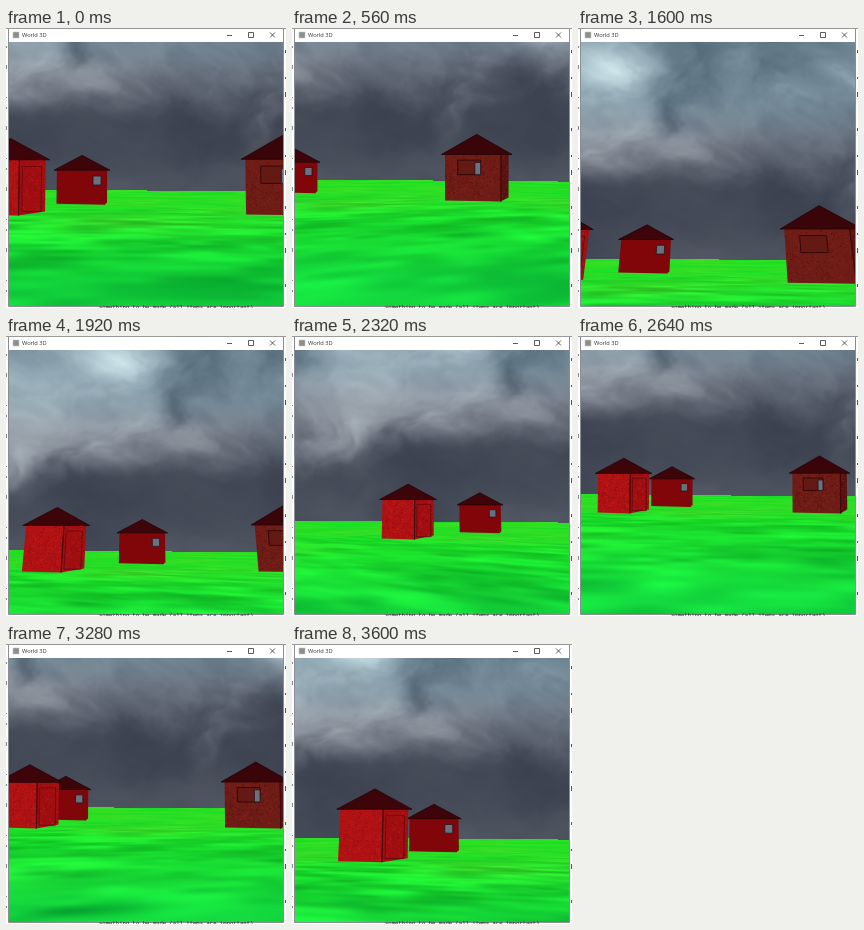
These frames come from a looping animation (280 px wide and 280 px high, 3.76 s). An HTML page with a canvas:

```html
<!DOCTYPE html>
<html lang="en">
<head>
<meta charset="utf-8">
<title>World 3D</title>
<style>
  html, body { margin: 0; width: 100%; height: 100%; overflow: hidden; background: #fff; }
  #stage { position: relative; width: 280px; height: 280px; overflow: hidden; background: #fff; }
  canvas, svg { position: absolute; left: 0; top: 0; }
  #title { position: absolute; left: 16px; top: 2px; font: 5.7px/10px "Open Sans", sans-serif; color: #333; white-space: nowrap; }
  #below { position: absolute; left: 93px; top: 277px; height: 3px; overflow: hidden; font: 5.6px/6px "Liberation Mono", monospace; color: #222; white-space: nowrap; }
</style>
</head>
<body>
<div id="stage">
  <canvas id="view" width="280" height="280"></canvas>
  <svg width="280" height="280" fill="none" stroke="#333">
    <path d="M0 .5H280" stroke="#999"/>
    <path d="M2.5 1V278.5H277.5V1" stroke="#8a8e92"/>
    <path d="M.5 18V270" stroke="#888" stroke-dasharray="2 17 4 28 1 9"/>
    <path d="M279.5 22V270" stroke="#555" stroke-dasharray="3 24 2 13 5 31"/>
    <rect x="7" y="4" width="6" height="6" fill="#8b8f8c" stroke="#c4c7c4" stroke-width=".6"/>
    <path d="M221 7.5h5M242.5 4.5h5v5h-5zM264 4.5l5 5M269 4.5l-5 5" stroke-width=".8"/>
  </svg>
  <div id="title">World 3D</div>
  <div id="below">something to be made (all items are important)</div>
</div>
<script>
const LOOP = 3760, STEP = 80, SIZE = 280, MID = SIZE / 2, FOCAL = 300;
const VIEW = { x: 3, y: 14, w: 274, h: 264 };
const ctx = document.getElementById('view').getContext('2d');

const lerp = (a, b, t) => a + (b - a) * t;
const clamp = (v, lo, hi) => Math.max(lo, Math.min(hi, v));
const smooth = (a, b, v) => {
  const s = clamp((v - a) / (b - a), 0, 1);
  return s * s * (3 - 2 * s);
};

function rng(seed) {
  return () => (seed = (seed * 1664525 + 1013904223) >>> 0) / 4294967296;
}

function makeCanvas(w, h) {
  const c = document.createElement('canvas');
  c.width = w;
  c.height = h;
  return c;
}

// Smooth value noise on a wrapped 64 x 64 lattice
const lattice = Float32Array.from({ length: 4096 }, rng(11));
function noise(x, y) {
  const xi = Math.floor(x), yi = Math.floor(y);
  const fx = smooth(0, 1, x - xi), fy = smooth(0, 1, y - yi);
  const at = (i, j) => lattice[((yi + j) & 63) * 64 + ((xi + i) & 63)];
  return lerp(lerp(at(0, 0), at(1, 0), fx), lerp(at(0, 1), at(1, 1), fx), fy);
}
function fbm(x, y) {
  let sum = 0, amp = .5;
  for (let i = 0; i < 5; i++, amp *= .48) {
    sum += amp * noise(x, y);
    x = x * 2.03 + 7;
    y = y * 2.03 + 3;
  }
  return sum;
}

// The camera looks around in wide sweeps; depth is the distance to the front row of houses
const path = [
  { t: 0, horizon: 163, pan: 140, x: 4.67, depth: 41 },
  { t: 560, horizon: 153, pan: 46, x: 3.5, depth: 49 },
  { t: 1200, horizon: 197, pan: -30, x: 3, depth: 43.5 },
  { t: 1600, horizon: 232, pan: 160, x: 6.8, depth: 42 },
  { t: 2320, horizon: 186, pan: 288, x: 8.9, depth: 57 },
  { t: 2960, horizon: 142, pan: 20, x: 1.5, depth: 55 },
  { t: 3600, horizon: 195, pan: 194, x: 3.9, depth: 43 }
];

function cameraAt(t) {
  let i = 0;
  while (i < path.length - 2 && t >= path[i + 1].t) i++;
  const a = path[i], b = path[i + 1], before = path[i - 1] || a, after = path[i + 2] || b;
  const span = b.t - a.t, s = clamp((t - a.t) / span, 0, 1);
  const cam = {};
  for (const key of ['horizon', 'pan', 'x', 'depth']) {
    const m0 = (b[key] - before[key]) / (b.t - before.t) * span * .7;
    const m1 = (after[key] - a[key]) / (after.t - a.t) * span * .7;
    cam[key] = lerp(a[key], b[key], smooth(0, 1, s)) + s * (1 - s) * ((1 - s) * m0 - s * m1);
  }
  return cam;
}

// Sky panorama: a dark ragged bank below, pale blue clouds and three bright puffs above
const SKY_W = 900, SKY_H = 260;
const sky = makeCanvas(SKY_W, SKY_H);
function paintSky() {
  const c = sky.getContext('2d'), img = c.createImageData(SKY_W, SKY_H);
  const puffs = [[-120, 195], [90, 180], [205, 168]];
  for (let y = 0, p = 0; y < SKY_H; y++) {
    const e = SKY_H - y;
    for (let px = 0; px < SKY_W; px++, p += 4) {
      const x = px - SKY_W / 2;
      const warp = fbm(x / 95 + 40, y / 80 + 20);
      const cloud = fbm(x / 85 + warp * 1.5 + 40, y / 60 + warp * 1.2) - .48;
      const edge = 70 + 45 * noise(x / 75 + 9, 3);
      const high = smooth(edge - 28, edge + 40, e + cloud * 70);
      const blue = smooth(110, 170, e);
      let light = cloud * lerp(35, 130, high) + 10 * smooth(45, 0, e);
      for (const [gx, ge] of puffs) {
        const near = Math.exp(-(((x - gx) / 45) ** 2) - ((e - ge) / 30) ** 2);
        light += near * (22 + 190 * clamp(cloud + .05, 0, .35));
      }
      img.data.set([
        lerp(64, lerp(122, 113, blue), high) + light,
        lerp(69, lerp(130, 135, blue), high) + light,
        lerp(83, lerp(142, 149, blue), high) + light * .92,
        255
      ], p);
    }
  }
  c.putImageData(img, 0, 0);
}

const ground = makeCanvas(SIZE, SIZE);
const groundCtx = ground.getContext('2d');
const groundImg = groundCtx.createImageData(SIZE, SIZE);
function drawGround(cam) {
  const px = groundImg.data;
  const yaw = (cam.pan - MID) / FOCAL, cos = Math.cos(yaw), sin = Math.sin(yaw);
  px.fill(0);
  for (let y = Math.floor(cam.horizon) - 1; y < SIZE; y++) {
    for (let x = VIEW.x; x < VIEW.x + VIEW.w; x++) {
      const d = y - cam.horizon + 1 - (x - MID) * .008;
      if (d < 0) continue;
      const z = FOCAL / (d + 5), side = (x - MID) / (d + 5);
      const u = side * cos - z * sin + cam.x + 40;
      const v = side * sin + z * cos - cam.depth * .3 + 40;
      const near = clamp(d / 100, 0, 1);
      const n = (noise(u * .9, v * 2) - .5) * smooth(0, 40, d) + (noise(u * 2, v * 4.5) - .5) * .6 * smooth(15, 70, d);
      const tint = noise(u * .25, v * .25) * (1 - near);
      const shade = n * 62;
      const p = (y * SIZE + x) * 4;
      px[p] = 16 + tint * 50 + shade * .25;
      px[p + 1] = lerp(224, 204, near) + shade;
      px[p + 2] = lerp(34, 58, near) + shade * .3;
      px[p + 3] = 255;
    }
  }
  groundCtx.putImageData(groundImg, 0, 0);
  ctx.drawImage(ground, 0, 0);
}

// Sizes are in units of eye height; panes and frames are wall fractions: left, right, top, bottom
const houses = [
  { x: 0, back: 32, half: 2.04, tall: 2.52, pitch: .265, split: .96, drop: 2,
    wall: '#80060a', side: '#80060a', roof: '#3d0509', pane: [.72, .88, .17, .43] },
  { x: -.9, back: 0, half: 1.62, tall: 2.28, pitch: .27, split: .63, drop: 4,
    wall: '#b01214', side: '#a00e11', roof: '#3d0509', grain: ['#7c0b10', '#cf2824'], door: true },
  { x: 10.3, back: 0, half: 1.73, tall: 2.3, pitch: .285, split: .88, drop: 4,
    wall: '#6e1c15', side: '#581310', roof: '#3a0508', grain: ['#481010', '#933029'],
    frame: [.2, .56, .12, .43], pane: [.47, .56, .17, .43], lowOnly: true }
];

function drawHouse(h, cam) {
  const scale = 1000 / (cam.depth + h.back);
  const mid = cam.pan + (h.x - cam.x) * scale, half = h.half * scale;
  if (mid + half < 0 || mid - half > SIZE) return;
  const base = cam.horizon + scale, eave = base - h.tall * scale;
  const lean = (cam.horizon - 152) * 1.2e-5;
  const X = u => mid + (u * 2 - 1) * half * .9, Y = v => lerp(eave, base, v);

  // Looking up spreads the foot of the walls away from the middle
  const shape = (fill, stroke, pts) => {
    ctx.beginPath();
    for (const [x, y] of pts) ctx.lineTo(x + (x - MID) * (y - eave) * lean, y);
    ctx.closePath();
    if (fill) { ctx.fillStyle = fill; ctx.fill(); }
    if (stroke) { ctx.strokeStyle = stroke; ctx.stroke(); }
  };
  const box = ([l, r, t, b], fill, stroke) =>
    shape(fill, stroke, [[X(l), Y(t)], [X(r), Y(t)], [X(r), Y(b)], [X(l), Y(b)]]);

  const corner = X(h.split);
  ctx.lineWidth = .8;
  shape(h.side, null, [[corner - .5, eave - 1], [X(1), eave - 1], [X(1), base - h.drop], [corner - .5, base]]);
  shape(h.wall, null, [[X(0), eave - 1], [corner, eave - 1], [corner, base], [X(0), base - 1]]);
  if (h.grain) {
    const next = rng(5);
    ctx.globalAlpha = .55;
    for (let i = 0; i < 420; i++) {
      const x = X(next() * .98), y = Y(next() * .92);
      ctx.fillStyle = h.grain[i & 1];
      ctx.fillRect(x + (x - MID) * (y - eave) * lean, y, 1, 1);
    }
    ctx.globalAlpha = 1;
    shape(null, '#3c080b', [[corner, eave], [corner, base]]);
  }
  if (h.door) box([lerp(h.split, 1, .12), lerp(h.split, 1, .85), .12, .93], null, '#5c090d');
  if (h.frame) box(h.frame, '#651914', '#250607');
  if (h.pane && !(h.lowOnly && cam.horizon > 178)) box(h.pane, '#69737f', '#2c1018');
  shape(h.roof, '#240407', [[mid - half, eave], [mid, eave - h.pitch * half * 2], [mid + half, eave]]);
}

function draw(t) {
  const cam = cameraAt(t);
  ctx.clearRect(0, 0, SIZE, SIZE);
  ctx.save();
  ctx.beginPath();
  ctx.rect(VIEW.x, VIEW.y, VIEW.w, VIEW.h);
  ctx.clip();
  ctx.drawImage(sky, cam.pan - SKY_W / 2, cam.horizon - SKY_H + 2);
  drawGround(cam);
  for (const h of houses) drawHouse(h, cam);
  ctx.restore();
}

// Every sixth step repeats the one before it
function heldStep(ms) {
  const k = Math.floor(ms % LOOP / STEP);
  return k % 6 === 4 ? k - 1 : k;
}

paintSky();
const start = performance.now();
let shown = -1;
function tick() {
  const k = heldStep(Math.max(0, performance.now() - start));
  if (k !== shown) draw((shown = k) * STEP);
  requestAnimationFrame(tick);
}
tick();
</script>
</body>
</html>
```
